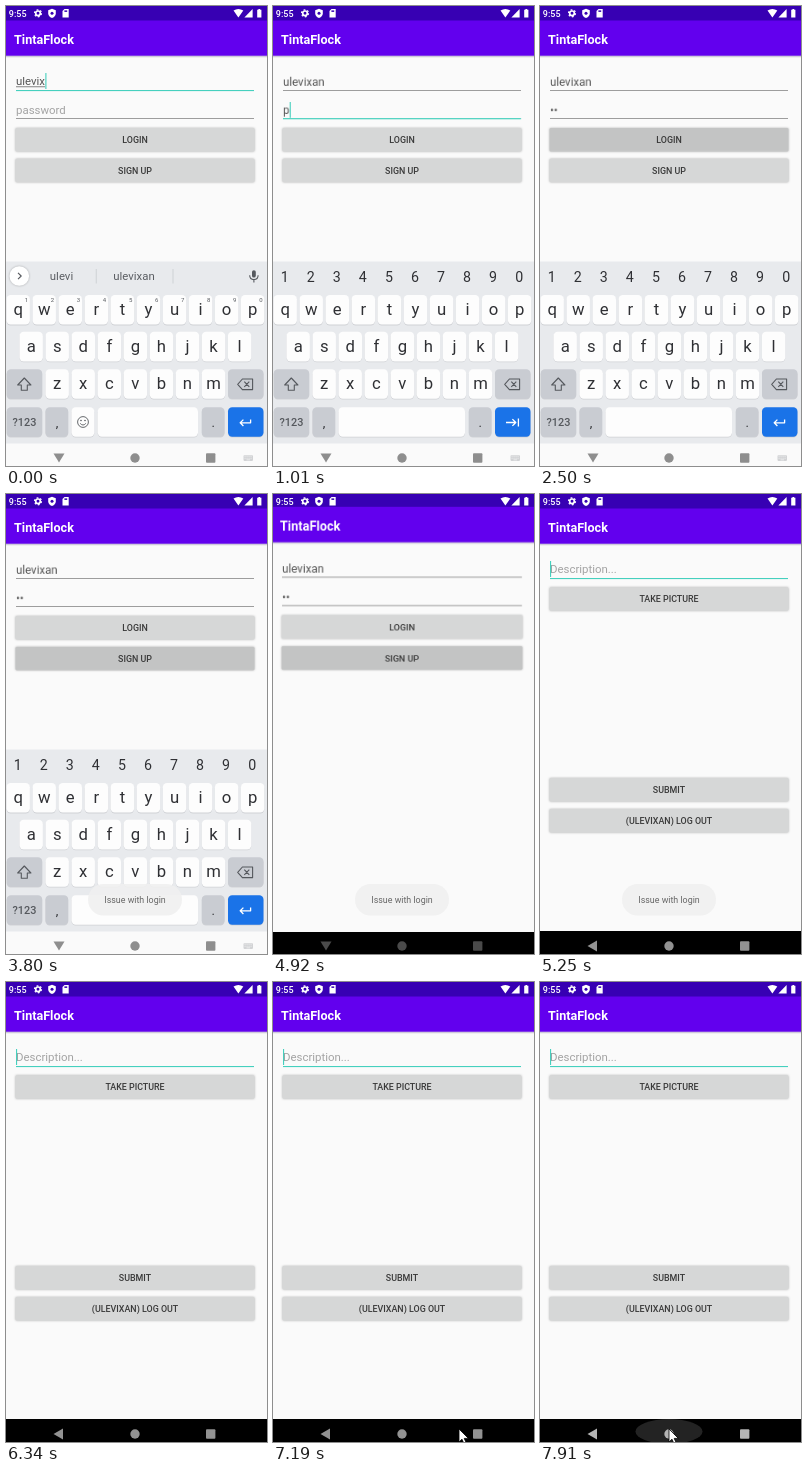
An HTML page that plays this animation: 261x460 px, repeating every 8000 ms.

```html
<!DOCTYPE html>
<html lang="en">
<head>
<meta charset="utf-8">
<title>Sign-in flow</title>
<style>
  html, body { margin: 0; width: 100%; height: 100%; overflow: hidden; background: #fafafa; }
  svg { display: block; width: 100vw; height: 100vh; font-family: Roboto, "Noto Sans", sans-serif; }
  text { white-space: pre; }
  .screen { transform-origin: 130.5px 230px; }
  .lift { filter: drop-shadow(0 .6px .8px rgba(0, 0, 0, .28)); }
  .ripple { transform-box: fill-box; transform-origin: center; }
</style>
</head>
<body>
<svg id="stage" viewBox="0 0 261 460"></svg>
<script>
const LOOP = 8000;
const TEAL = '#45d0be', INK = '#2f3034', ICON = '#55585d', HINT = '#a3a3a3', GREY_KEY = '#c9ccd2';
const USER = 'ulevixan', APP = 'TintaFlock';
const stage = document.getElementById('stage');

// ---------- drawing helpers ----------
function add(parent, tag, attrs = {}, content) {
  const node = document.createElementNS('http://www.w3.org/2000/svg', tag);
  for (const key in attrs) node.setAttribute(key, attrs[key]);
  if (content !== undefined) node.textContent = content;
  parent.append(node);
  return node;
}
const group = (parent, cls = '') => add(parent, 'g', { class: cls });
const rect = (parent, x, y, width, height, fill, rx = 0) =>
  add(parent, 'rect', { x, y, width, height, fill, rx });
const label = (parent, x, y, str, size, fill, weight = 400) =>
  add(parent, 'text', { x, y, 'font-size': size, fill, 'font-weight': weight }, str);
const centred = (parent, x, y, str, size, fill, weight = 400) => {
  const node = label(parent, x, y, str, size, fill, weight);
  node.setAttribute('text-anchor', 'middle');
  return node;
};
const shape = (parent, d, fill) => add(parent, 'path', fill ? { d, fill } : { d });
const stroke = (parent, d, color, width = 1.1) => add(parent, 'path', {
  d, fill: 'none', stroke: color, 'stroke-width': width, 'stroke-linejoin': 'round'
});

// ---------- timing helpers ----------
// steps: [time, value, easing]; without easing the value holds until the next step
function track(node, prop, steps) {
  const frames = steps.map(([time, value, easing = 'step-end']) =>
    ({ offset: time / LOOP, [prop]: value, easing }));
  if (steps[0][0] > 0) frames.unshift({ ...frames[0], offset: 0, easing: 'step-end' });
  if (steps.at(-1)[0] < LOOP) frames.push({ ...frames.at(-1), offset: 1 });
  node.animate(frames, { duration: LOOP, iterations: Infinity });
  return node;
}
function show(node, ...spans) {
  const steps = spans.flatMap(([from, to]) => [[from, 1], [to, 0]]);
  if (steps[0][0] > 0) steps.unshift([0, 0]);
  return track(node, 'opacity', steps);
}

// ---------- app parts ----------
function screen() {
  const g = group(stage, 'screen');
  rect(g, 0, 0, 261, 460, '#fafafa');
  rect(g, 0, 49, 261, 2, '#cfc9dc');
  rect(g, 0, 51, 261, 1, '#eeeef0');
  rect(g, 0, 0, 261, 49.7, '#6200ee');
  rect(g, 0, 0, 261, 14.5, '#3700b3');
  label(g, 8, 37.8, APP, 12.6, '#fff', 700);
  return g;
}

function underline(parent, y, from, to) {
  rect(parent, 10, y, 238, .8, '#868686');
  const active = show(group(parent), [from, to]);
  rect(active, 10, y, 238, 1, '#fafafa');
  rect(active, 10, y, 238, 1.1, TEAL);
}

function caret(parent, x, y, ...spans) {
  show(rect(parent, x, y, 1.1, 16, TEAL), ...spans);
}

function typed(parent, y, str, from, to, color = '#555') {
  const node = label(parent, 10, y, str, 11.43, color);
  show(node, [from, to]);
  return 10 + node.getComputedTextLength();
}

function button(parent, y, str) {
  rect(parent, 9.5, y, 239, 23.5, '#d6d7d7', 1.3).setAttribute('class', 'lift');
  const focus = rect(parent, 9.5, y, 239, 23.5, 'rgba(0,0,0,.085)', 1.3);
  const ripple = rect(parent, 9.5, y, 239, 23.5, '#000', 1.3);
  ripple.setAttribute('class', 'ripple');
  focus.setAttribute('opacity', 0);
  ripple.setAttribute('opacity', 0);
  centred(parent, 129, y + 15, str, 8.9, '#3a3a3a', 500);
  return { focus, ripple };
}

function press(ripple, start, end) {
  const mid = start + (end - start) * .5;
  track(ripple, 'opacity', [[0, 0], [start, .1], [mid, .1, 'linear'], [end, 0]]);
  track(ripple, 'transform', [[0, 'scaleX(.1)'], [start, 'scaleX(.1)', 'ease-out'], [mid, 'scaleX(1)']]);
}

// ---------- sign-in screen ----------
const login = screen();

underline(login, 84, 0, 610);
[[6, 0, 90], [7, 90, 180], [8, 180, LOOP]].forEach(([count, from, to]) => {
  const end = typed(login, 79.4, USER.slice(0, count), from, to);
  caret(login, end + .3, 67, [from, Math.min(to, 610)]);
  if (count === 6) show(rect(login, 10, 80.4, end - 10, .8, '#666'), [0, 340]);
  if (count === 8) show(rect(login, 10, 80.4, end - 10, .8, '#666'), [340, 610]);
});

underline(login, 112.1, 610, 2320);
typed(login, 108.1, 'password', 0, 1010, HINT);
caret(login, 10, 96, [610, 1010]);
caret(login, typed(login, 108.1, 'p', 1010, 1810) + .2, 96, [1010, 1500]);
caret(login, typed(login, 108.1, '•a', 1810, 2320) + .2, 96, [1810, 2320]);
typed(login, 108.1, '••', 2320, LOOP);

const enter = button(login, 122, 'LOGIN');
const join = button(login, 152.8, 'SIGN UP');
track(enter.focus, 'opacity', [[0, 0], [2380, 0, 'linear'], [2500, 1], [3450, 1, 'linear'], [3650, 0]]);
track(join.focus, 'opacity', [[0, 0], [3450, 0, 'linear'], [3650, 1]]);
press(enter.ripple, 2990, 3350);
press(join.ripple, 4370, 4680);
track(login, 'transform', [
  [0, 'scale(1)'], [4920, 'scale(1.008)'], [5010, 'scale(1.03)', 'ease-out'], [5250, 'scale(1.1)']
]);

// ---------- posting screen ----------
const post = screen();

rect(post, 10, 84, 238, 1.1, TEAL);
label(post, 10, 79.4, 'Description...', 11.43, HINT);
caret(post, 10, 67, [0, 5880], [6340, 6830], [7190, 7640], [7850, LOOP]);
button(post, 93.3, 'TAKE PICTURE');
button(post, 284, 'SUBMIT');
button(post, 315, `(${USER.toUpperCase()}) LOG OUT`);
track(post, 'opacity', [[0, 0], [5000, 0, 'linear'], [5080, 1]]);
track(post, 'transform', [
  [0, 'scale(.9)'], [5000, 'scale(.9)', 'cubic-bezier(.1,.6,.2,1)'], [5250, 'scale(1)']
]);

// ---------- status bar ----------
const status = group(stage);
label(status, 2.8, 10.7, '9:55', 9, '#fff', 500);
add(status, 'circle', { cx: 32, cy: 7.3, r: 2.3, fill: 'none', stroke: '#fff', 'stroke-width': 1.7 });
add(status, 'circle', {
  cx: 32, cy: 7.3, r: 3.5, fill: 'none', stroke: '#fff', 'stroke-width': 1.2, 'stroke-dasharray': '1.8 1.86'
});
shape(status, 'M46 2.8l3.8 1.5v2.9q0 3.2-3.8 4.9q-3.8-1.7-3.8-4.9V4.3z', '#fff');
add(status, 'circle', { cx: 46, cy: 7.2, r: 1.5, fill: '#3700b3' });
shape(status, 'M58.5 3h4.2v8.4h-6.2V5z', '#fff');
rect(status, 58.4, 4.4, 2.8, 1.5, '#3700b3');
shape(status, 'M227.5 4.6q4.9-3.2 9.8 0l-4.9 6.8z', '#fff');
shape(status, 'M246.6 3v8.4h-8.2z', '#fff');
shape(status, 'M251.2 3.8h1.2V3h1.8v.8h1.2v7.6h-4.2z', '#fff');

// ---------- navigation bar ----------
const nav = group(stage);
track(rect(nav, 0, 437, 261, 24, '#000'), 'transform',
  [[0, 'translateY(1px)'], [5010, 'translateY(0px)']]);
show(rect(nav, 0, 437, 261, 23, '#fafafa'), [0, 4920]);
track(add(nav, 'ellipse', { cx: 129, cy: 449.5, rx: 33.5, ry: 12.5, fill: '#fff' }), 'opacity',
  [[0, 0], [7760, 0, 'linear'], [7900, .14]]);

const icons = group(nav);
show(shape(icons, 'M47.5 447.5h11l-5.5 9z'), [0, 5010]);
show(shape(icons, 'M57 446.5v11l-9.5-5.5z'), [5010, LOOP]);
add(icons, 'circle', { cx: 129, cy: 452, r: 4.7 });
add(icons, 'rect', { x: 200, y: 447.3, width: 9.4, height: 9.4, rx: .9 });
track(icons, 'fill', [[0, '#8e8e8e'], [4920, '#4a4a4a'], [5010, '#929292'], [7790, '#b4b4b4']]);

const swap = show(group(nav), [0, 4920]);
rect(swap, 237.5, 449.3, 9.5, 5.6, '#d2d3d5', .8);
for (let i = 0; i < 8; i++) rect(swap, 238.6 + i % 4 * 2, 450.4 + (i >> 2) * 1.5, .9, .7, '#fafafa');
rect(swap, 240.5, 453.6, 3.6, .6, '#fafafa');

// ---------- keyboard ----------
const board = show(group(stage), [0, 4920]);
rect(board, 0, 255.5, 261, 182, '#e8eaed');

function key(parent, x, y, width, fill = '#fdfdfd') {
  rect(parent, x, y + .8, width, 29.6, '#cfd1d5', 4.2);
  rect(parent, x, y, width, 29.6, fill, 4.2);
}

const words = show(group(board), [0, 700]);
const digits = show(group(board), [700, 4920]);

[['qwertyuiop', 12.2, 289], ['asdfghjkl', 25.2, 325.8], ['zxcvbnm', 51.2, 363.2]].forEach(([row, x0, y]) => {
  [...row].forEach((letter, i) => {
    const x = x0 + i * 26.05;
    key(board, x - 11.7, y, 23.4);
    centred(board, x, y + 19.7, letter, 16.7, INK);
  });
});

const hints = show(group(board), [0, 700]);
for (let i = 0; i < 10; i++) {
  const x = 12.2 + i * 26.05, digit = (i + 1) % 10;
  centred(digits, x - .5, 276, digit, 14.2, INK);
  centred(hints, x + 8.2, 296, digit, 6, ICON);
}

key(board, .7, 363.2, 35.5, GREY_KEY);
stroke(board, 'M18.3 372l6.6 7h-3.6v5.3h-6V379h-3.6z', ICON);
key(board, 222, 363.2, 35.5, GREY_KEY);
stroke(board, 'M236.4 373h10.2v10.6h-10.2l-4.7-5.3zM238.3 375.7l5 5.2M243.3 375.7l-5 5.2', ICON);

key(board, .7, 401.2, 35.5, GREY_KEY);
centred(board, 18.4, 420, '?123', 10.9, ICON, 500);
key(board, 39.5, 401.2, 22.7, GREY_KEY);
centred(board, 51, 420.8, ',', 13, INK);
key(board, 195.8, 401.2, 22.7, GREY_KEY);
centred(board, 207.2, 420.8, '.', 13, INK);
key(board, 222, 401.2, 35.5, '#1a73e8');
show(stroke(board, 'M244.6 413.4v3.4h-10.4M237.4 413.6l-3.2 3.2 3.2 3.2', '#fff', 1.3), [0, 700], [2410, 4920]);
show(stroke(board, 'M233 416.5h9.8M239.4 413.1l3.4 3.4-3.4 3.4M245.4 412.6v7.8', '#fff', 1.3), [700, 2410]);

key(digits, 65.5, 401.2, 126.5);
key(words, 65.5, 401.2, 22.8);
key(words, 91.7, 401.2, 100.3);
add(words, 'circle', { cx: 77, cy: 416, r: 5.4, fill: 'none', stroke: ICON, 'stroke-width': .9 });
stroke(words, 'M74.2 417.4q2.8 3.2 5.6 0', ICON, .9);
for (const x of [75, 79]) add(words, 'circle', { cx: x, cy: 414.5, r: .8, fill: ICON });

add(words, 'circle', { cx: 13.3, cy: 270, r: 9.8, fill: '#fff', class: 'lift' });
stroke(words, 'M12 266.8l3.2 3.2-3.2 3.2', ICON);
rect(words, 89.8, 263, .8, 14.5, '#c9ccd0');
rect(words, 166.6, 263, .8, 14.5, '#c9ccd0');
[[55.5, 'ulevi', 0, 180], [55.5, 'ulevixa', 180, 700], [128, USER, 0, 340], [128, USER + 'o', 340, 700]]
  .forEach(([x, str, from, to]) => show(centred(words, x, 274.3, str, 11.4, '#5b5e63'), [from, to]));
rect(words, 246, 264.2, 3.8, 7.4, ICON, 1.9);
stroke(words, 'M243.7 269.3q0 4.3 4.2 4.3t4.2-4.3M247.9 273.6v2.8', ICON);

// ---------- toast ----------
const toast = group(stage);
rect(toast, 82, 390, 94, 31.5, 'rgba(240,240,240,.9)', 15.7);
centred(toast, 129, 409.2, 'Issue with login', 8.9, '#666');
track(toast, 'opacity', [[0, 0], [3300, 0, 'linear'], [3650, 1], [5370, 1, 'linear'], [5730, 0]]);

// ---------- pointer ----------
const pointer = add(stage, 'path', {
  d: 'M0 0v13l3-2.8 2.3 5.2 2.2-1-2.3-5h4.2z', fill: '#fff', stroke: '#000', 'stroke-width': .8
});
show(pointer, [6770, LOOP]);
track(pointer, 'transform', [
  [6770, 240, 398], [6890, 216, 430], [7040, 199, 444], [7190, 186, 447], [7240, 186, 447],
  [7400, 158, 449], [7550, 137, 448], [7640, 129, 447]
].map(([time, x, y]) => [time, `translate(${x}px, ${y}px)`, 'linear']));
</script>
</body>
</html>
```
